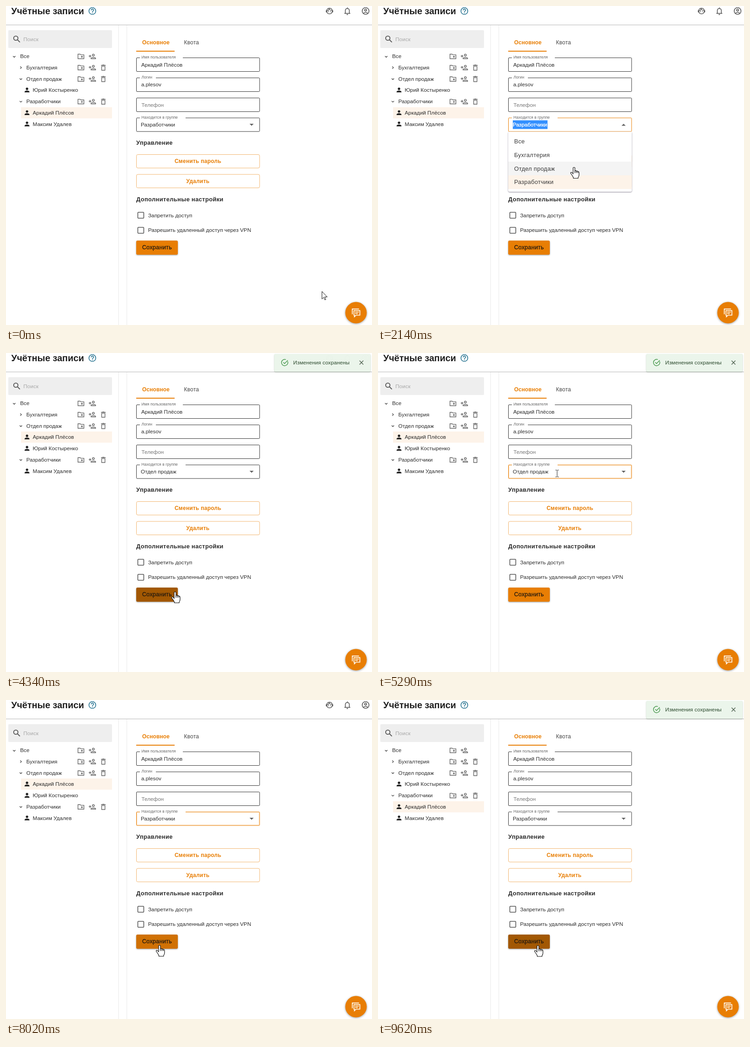
An HTML page that plays this animation: 801x699 px, repeating every 9690 ms.

```html
<!DOCTYPE html>
<html lang="ru">
<head>
<meta charset="utf-8">
<title>Учётные записи</title>
<style>
  html, body { margin: 0; width: 100%; height: 100%; overflow: hidden; background: #fff; }
  svg { display: block; position: absolute; left: 0; top: 0; }
  text { font: 11.7px "Liberation Sans", Arial, sans-serif; letter-spacing: .04px; fill: #2b2b2b; white-space: pre; }
  text.h1 { font-size: 20px; font-weight: 700; letter-spacing: 0; fill: #1f1f1f; }
  text.h2 { font-size: 13px; font-weight: 700; letter-spacing: .3px; }
  text.btn { font-size: 12px; font-weight: 700; letter-spacing: .24px; fill: #e87e04; text-anchor: middle; }
  text.tab { font-size: 12px; font-weight: 700; letter-spacing: .1px; fill: #e87e04; }
  text.label { font-size: 8.7px; fill: #666; }
  text.hint { fill: #777; }
  text.opt { font-size: 13px; letter-spacing: .27px; fill: #3a3a3a; }
  text.save { font-size: 12.5px; letter-spacing: .33px; fill: #241a10; stroke: #241a10; stroke-width: .3px; }
  .line { fill: none; stroke: #666; stroke-width: 2; }
  .box { fill: none; stroke: #333; }
  .out { fill: #fff; stroke: #f2b56f; }
  .out.hover { fill: #fef8f1; stroke: #e87e04; }
  .check { fill: none; stroke: #555; stroke-width: 1.6; }
  .drop { filter: drop-shadow(0 1px 1px rgba(40, 30, 60, .55)); }
  .lift { filter: drop-shadow(0 1px 1.5px rgba(0, 0, 0, .4)); }
  .ptr path { stroke-linejoin: round; }
</style>
</head>
<body>
<svg width="801" height="699" viewBox="0 0 801 699">
  <defs>
    <g id="folder" class="line" transform="scale(.72) translate(-12 -12)">
      <path d="M3 19V5H9.6L11.6 7H21V19ZM15 10V16M12 13H18"/>
    </g>
    <g id="add" class="line" transform="scale(.72) translate(-12 -12)">
      <circle cx="15" cy="8" r="3"/>
      <path d="M8 19V18C8 16 12 15 15 15S22 16 22 18V19ZM5 7V15M1 11H9"/>
    </g>
    <g id="trash" class="line" transform="scale(.72) translate(-12 -12)">
      <path d="M7 8V20H17V8ZM5 5H19M9 4H15"/>
    </g>
    <g id="man" fill="#222" transform="scale(.66) translate(-12 -12)">
      <circle cx="12" cy="8" r="4"/>
      <path d="M4 20V18C4 15.3 9.3 14 12 14S20 15.3 20 18V20Z"/>
    </g>
    <path id="chev" d="M-2.6 -1.3L0 1.3L2.6 -1.3" fill="none" stroke="#444" stroke-width="1.3"/>
    <g id="tools"><use href="#folder" x="164"/><use href="#add" x="189"/></g>
    <clipPath id="saveClip"><rect x="285" y="514" width="91" height="31" rx="3"/></clipPath>
  </defs>

  <!-- header -->
  <text class="h1" x="11.5" y="18">Учётные записи</text>
  <g fill="none" stroke="#23718f" stroke-width="1.6">
    <circle cx="189" cy="11" r="7.5"/>
    <path d="M186.4 9.4C186.4 5.8 191.7 5.8 191.7 9.2C191.7 11 189 11 189 13.2M189 14.4V16"/>
  </g>
  <g fill="none" stroke="#555" stroke-width="1.6">
    <circle cx="708" cy="11" r="6.3"/>
    <path d="M701 9.5V13.5M715 9.5V13.5" stroke-width="2"/>
    <path d="M702.6 11C705 10.2 706.8 8.4 707.4 6.2C708.6 8.6 710.8 9.9 713.6 9.9" stroke-width="1.4"/>
    <path d="M705 12.4H706.6M709.6 12.4H711.2"/>
    <path d="M742.6 15.6V10C742.6 4 751.4 4 751.4 10V15.6M740.5 16.2H753.5M747 5.2V3.2M745.4 18.6H748.6"/>
    <circle cx="787" cy="11" r="7.5"/><circle cx="787" cy="8.9" r="2.2"/>
    <path d="M781.8 16.2C784.5 13.6 789.5 13.6 792.2 16.2"/>
  </g>
  <path d="M0 41.5H801" stroke="#b5b5b5"/>
  <path d="M246.5 42V699M264.5 42V699" stroke="#e9e9e9"/>

  <!-- tree -->
  <rect x="5" y="53" width="227" height="39" rx="2" fill="#eee"/>
  <g fill="none" stroke="#555" stroke-width="1.8"><circle cx="21.5" cy="70.5" r="4.7"/><path d="M25 74L30.5 79.3"/></g>
  <text x="38" y="77" style="fill:#a8a8a8;letter-spacing:.2px">Поиск</text>
  <use href="#chev" x="18" y="111"/><text x="31" y="114">Все</text><use href="#tools" y="110.5"/>
  <use href="#chev" transform="translate(32.5 135) rotate(-90)"/><text x="44.5" y="138.5">Бухгалтерия</text>
  <use href="#tools" y="135"/><use href="#trash" x="213" y="135"/>
  <use href="#chev" x="32.5" y="160"/><text x="44.5" y="163.5">Отдел продаж</text>
  <use href="#tools" y="160"/><use href="#trash" x="213" y="160"/>
  <g id="mover">
    <rect x="33" y="-12" width="199" height="24.5" fill="#fdf3e9"/>
    <use href="#man" x="46"/><text x="58.5" y="4">Аркадий Плёсов</text>
  </g>
  <g id="peer"><use href="#man" x="46"/><text x="58.5" y="4">Юрий Костыренко</text></g>
  <g id="devs">
    <use href="#chev" x="32.5" y=".5"/><text x="44.5" y="4">Разработчики</text>
    <use href="#tools" y=".5"/><use href="#trash" x="213" y=".5"/>
  </g>
  <use href="#man" x="46" y="258.5"/><text x="58.5" y="262.5">Максим Удалев</text>

  <!-- form -->
  <text class="tab" x="298" y="84">Основное</text>
  <text x="389.5" y="84" style="font-size:12px;letter-spacing:.25px;fill:#444">Квота</text>
  <rect x="285" y="98" width="84" height="2" fill="#e87e04"/>
  <rect class="box" x="285.5" y="113.5" width="269.5" height="30" rx="1.5"/>
  <rect class="box" x="285.5" y="157.5" width="269.5" height="30" rx="1.5"/>
  <rect class="box" x="285.5" y="201.5" width="269.5" height="30" rx="1.5"/>
  <rect id="halo" x="286.5" y="246" width="267.5" height="28" fill="none" stroke="#e87e04" stroke-opacity=".35"/>
  <rect id="frame" class="box" x="285.5" y="245.2" width="269.5" height="29.8" rx="1.5"/>
  <path d="M293 113.5H387M293 157.5H328M293 245.5H393" stroke="#fff" stroke-width="4"/>
  <text class="label" x="296.5" y="115">Имя пользователя</text>
  <text class="label" x="296.5" y="159">Логин</text>
  <text class="label" x="296.5" y="246.5">Находится в группе</text>
  <text x="296" y="132.5">Аркадий Плёсов</text>
  <text x="296" y="176">a.plesov</text>
  <text class="hint" x="296.5" y="220.5">Телефон</text>
  <rect id="mark" x="295" y="250.5" width="76" height="19" fill="#3390ff"/>
  <text id="value" x="295" y="264"></text>
  <path id="caret" d="M369.5 253V266" stroke="#222"/>
  <path id="tri" d="M-4.5 -2.3H4.5L0 2.3Z" fill="#666"/>

  <text class="h2" x="285" y="304">Управление</text>
  <rect id="pass" class="out" x="285.5" y="325.5" width="269.5" height="29.5" rx="3"/>
  <text class="btn" x="420" y="343.5">Сменить пароль</text>
  <rect id="del" class="out" x="285.5" y="369" width="269.5" height="29.5" rx="3"/>
  <text class="btn" x="420" y="387.5">Удалить</text>
  <text class="h2" x="285" y="428">Дополнительные настройки</text>
  <rect class="check" x="288.5" y="452" width="13" height="13" rx="1.2"/>
  <text x="311" y="462.5">Запретить доступ</text>
  <rect class="check" x="288.5" y="485" width="13" height="13" rx="1.2"/>
  <text x="311" y="495">Разрешить удаленный доступ через VPN</text>

  <rect class="lift" x="285" y="514" width="91" height="31" rx="3" fill="#e87e04"/>
  <g clip-path="url(#saveClip)">
    <rect id="shade" x="285" y="514" width="91" height="31"/>
    <circle id="ripple"/>
  </g>
  <text class="save" x="298" y="533">Сохранить</text>

  <!-- list -->
  <g id="list">
    <rect class="drop" x="285" y="275.5" width="270.5" height="131.5" rx="3" fill="#fff"/>
    <rect id="picked" x="285" width="270.5" height="30" fill="#fdf3e9"/>
    <rect id="over" x="285" width="270.5" height="30" fill="#f4f4f4"/>
    <text class="opt" x="298" y="301">Все</text>
    <text class="opt" x="298" y="331">Бухгалтерия</text>
    <text class="opt" x="298" y="360.5">Отдел продаж</text>
    <text class="opt" x="298" y="390">Разработчики</text>
  </g>

  <!-- chat button -->
  <circle cx="766" cy="672" r="23.5" fill="#e87e04" style="filter:drop-shadow(0 1.5px 2px rgba(0,0,0,.4))"/>
  <g fill="none" stroke="#fff" stroke-width="1.7">
    <path d="M757.8 675.5V663.8H772.5"/>
    <path d="M761.5 667.3H774.5V677.5H766L762.5 681V677.5H761.5Z"/>
    <path d="M764 670.8H772M764 674H770" stroke-width="1.4"/>
  </g>

  <g id="toast">
    <rect x="587" y="2" width="211" height="39" rx="3" fill="#ebf5eb" style="filter:drop-shadow(0 1px 1px rgba(60,90,60,.35))"/>
    <g fill="none" stroke="#4a9a50" stroke-width="1.5">
      <path d="M616.4 18.6A7 7 0 1 1 612.4 14.4"/><path d="M606.8 20.4L609.6 23.2L616.6 16"/>
    </g>
    <text x="628.5" y="25" style="fill:#2c4a2e">Изменения сохранены</text>
    <path d="M773.8 16.8L782.2 25.2M782.2 16.8L773.8 25.2" stroke="#4d604e" stroke-width="1.4"/>
  </g>

  <g id="ptr" class="ptr">
    <path id="arrow" d="M.5 .5V17L4.3 13.4L6.8 19L9 18L6.6 12.5H12Z" fill="#fff" stroke="#111"/>
    <path id="beam" d="M-3.5 -7.5H-1L0 -6.5L1 -7.5H3.5M-3.5 7.5H-1L0 6.5L1 7.5H3.5M0 -6.5V6.5" fill="none" stroke="#222"/>
    <g id="hand" fill="#fff" stroke="#111" stroke-width="1.2">
      <path d="M-2 2.2Q-2 .5 0 .5Q2 .5 2 2.2V9Q2.2 7.5 3.7 7.7Q5.3 8 5.3 9.6Q5.8 8.3 7.2 8.7Q8.4 9 8.4 10.6Q9 9.6 10 10Q11 10.5 11 12V17Q11 20 9 22.5V24.5H-1.5V22.5Q-3 20 -4.5 17.5L-7 14Q-8 12 -6.5 11.5Q-5 11 -3.5 13L-2 15Z"/>
      <path d="M2 9V13M5.3 9.6V13M8.4 10.6V13" fill="none"/>
    </g>
  </g>
</svg>
<script>
  const LOOP = 9690;
  const $ = id => document.getElementById(id);
  const show = (id, on) => { $(id).style.display = on ? '' : 'none'; };
  const move = (id, x, y) => $(id).setAttribute('transform', `translate(${x} ${y})`);
  const set = (id, attrs) => { for (const k in attrs) $(id).setAttribute(k, attrs[k]); };
  const within = (t, ...spans) => spans.some(([a, b]) => t >= a && t < b);
  const ramp = (t, a, b) => Math.min(1, Math.max(0, (t - a) / (b - a)));
  const smooth = p => p * p * (3 - 2 * p);
  const easeOut = p => 1 - (1 - p) ** 3;

  // pointer stops: time, x, y
  const PATH = [
    [60, 691, 625], [930, 449, 259], [1730, 449, 259], [2000, 435, 365], [2140, 429, 353],
    [2960, 429, 353], [3340, 371, 517], [3620, 370, 523], [4700, 370, 523], [5290, 392, 264],
    [5950, 392, 264], [6410, 377, 383.5], [7690, 377, 383.5], [8020, 336, 537],
    [9619, 336, 537], [9620, 350, 537.5]
  ];
  const PRESS = [3890, 8280];
  const OPEN = [[1200, 2610], [5550, 6910]];
  const FOCUS = [[870, PRESS[0]], [5230, PRESS[1]]];

  function pointer(t) {
    const i = PATH.findIndex(k => k[0] > t);
    if (i === 0) return PATH[0].slice(1);
    if (i < 0) return PATH[PATH.length - 1].slice(1);
    const [a, ax, ay] = PATH[i - 1], [b, bx, by] = PATH[i];
    const p = smooth(ramp(t, a, b));
    return [ax + (bx - ax) * p, ay + (by - ay) * p];
  }

  function drawTree(t) {
    const moved = within(t, [4150, 8540]);
    const row = n => 109.5 + 24.85 * n;
    move('mover', 0, row(moved ? 3 : 5));
    move('peer', 0, row(moved ? 4 : 3));
    move('devs', 0, row(moved ? 5 : 4));
  }

  function drawField(t, open) {
    const sales = within(t, [2610, 6910]);
    const focus = within(t, ...FOCUS);
    $('value').textContent = sales ? 'Отдел продаж' : 'Разработчики';
    $('value').style.cssText = open ? 'fill:#fff;stroke:#fff;stroke-width:.3px' : '';
    $('frame').style.stroke = focus ? '#e87e04' : '';
    show('halo', focus && !open);
    show('mark', open);
    set('mark', { width: sales ? 78 : 76 });
    show('caret', within(t, [2610, 3030], [6910, 7410]));
    move('caret', sales ? 4 : 0, 0);
    set('tri', { transform: `translate(537.5 260.2) scale(1 ${open ? -1 : 1})` });
    set('picked', { y: sales ? 341 : 371 });
  }

  function drawSave(t) {
    const hover = ramp(t, 3270, 3520) - ramp(t, 4720, 4950) + ramp(t, 7900, 8020);
    const second = t >= PRESS[1];
    const grow = ramp(t, PRESS[+second], PRESS[+second] + 420);
    const fade = second ? 0 : ramp(t, 4720, 5000);
    set('shade', { opacity: .105 * hover });
    set('ripple', {
      cx: second ? 336 : 370, cy: second ? 537 : 523,
      r: 100 * easeOut(grow), opacity: .225 * (1 - fade)
    });
  }

  function drawToast(t) {
    const p = easeOut(ramp(t, 4130, 4390)) - smooth(ramp(t, 6130, 6330)) + easeOut(ramp(t, 8550, 8810));
    set('toast', {
      opacity: p,
      transform: `translate(692.5 21.5) scale(${.75 + .25 * p} ${.5625 + .4375 * p}) translate(-692.5 -21.5)`
    });
  }

  function drawPointer(t, open) {
    const [x, y] = pointer(t);
    const hit = (x0, y0, x1, y1) => x >= x0 && x <= x1 && y >= y0 && y <= y1;
    const item = open && hit(285, 281, 555, 400) ? Math.floor((y - 281) / 30) : -1;
    const pass = !open && hit(285, 325, 555, 355);
    const del = !open && hit(285, 369, 555, 399);
    const beam = hit(285, 245, 525, 275);
    const hand = item >= 0 || pass || del || hit(285, 514, 376, 545);
    $('pass').classList.toggle('hover', pass);
    $('del').classList.toggle('hover', del);
    show('over', item >= 0);
    if (item >= 0) set('over', { y: 281 + 30 * item });
    show('hand', hand);
    show('beam', beam);
    show('arrow', !hand && !beam);
    move('ptr', x, y);
  }

  function draw(t) {
    const open = within(t, ...OPEN);
    show('list', open);
    drawTree(t);
    drawField(t, open);
    drawSave(t);
    drawToast(t);
    drawPointer(t, open);
  }

  const start = performance.now();
  function tick() {
    draw((performance.now() - start) % LOOP);
    requestAnimationFrame(tick);
  }
  tick();
</script>
</body>
</html>
```
